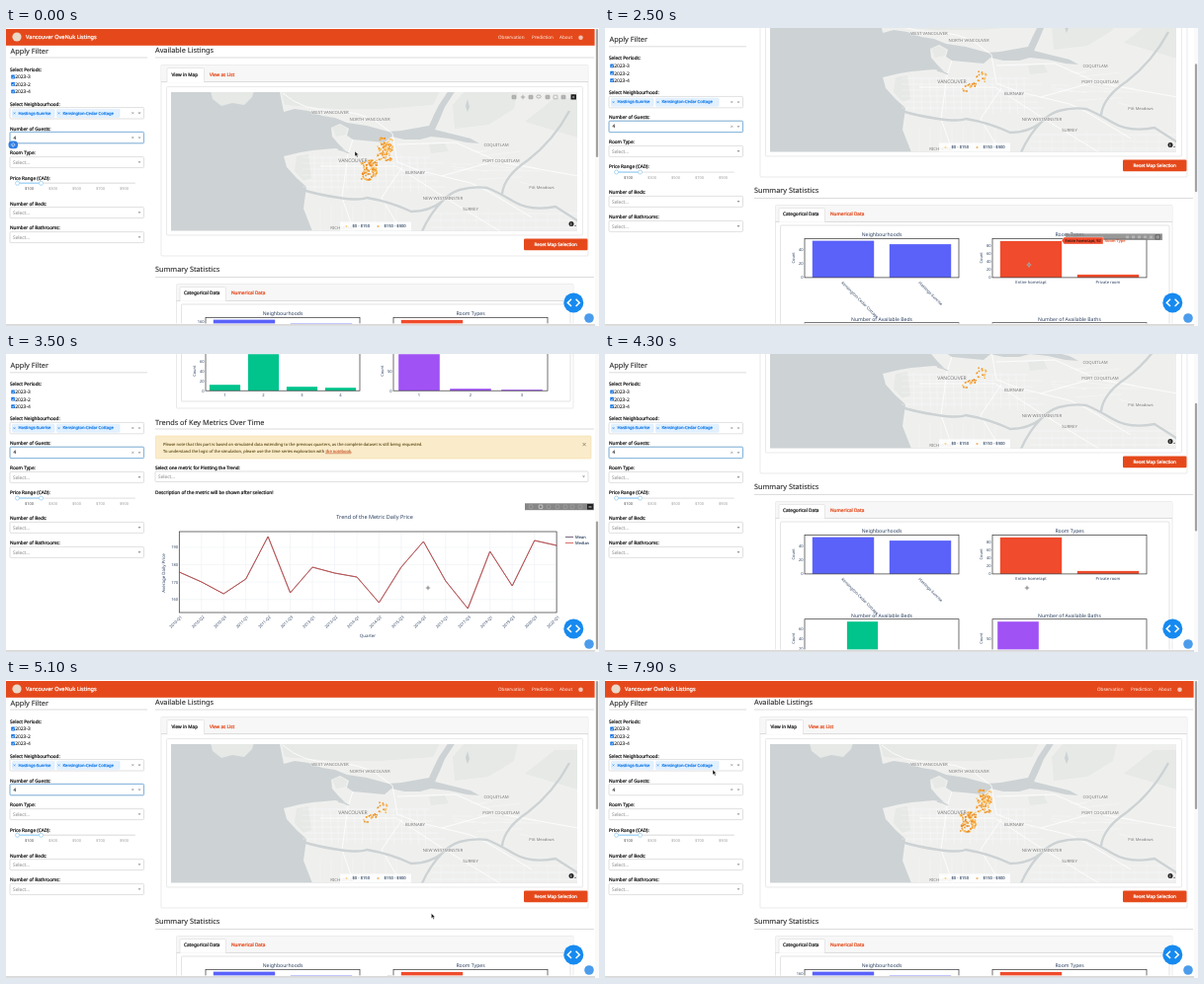
An HTML page for the animation above (8 s loop, 600 px wide and 302 px high).

```html
<!DOCTYPE html>
<html lang="en">
<head>
<meta charset="utf-8">
<title>Listings dashboard</title>
<style>
html, body { margin: 0; width: 100%; height: 100%; overflow: hidden; background: #fff; }
svg { display: block; width: 600px; height: 302px; }
text { font-family: "Noto Sans", "Open Sans", sans-serif; text-rendering: geometricPrecision; white-space: pre; }
.medium { stroke-width: .24px; }
</style>
</head>
<body>
<svg id="stage" viewBox="0 0 600 302" xmlns="http://www.w3.org/2000/svg"></svg>
<script>
const ORANGE = '#e5491b', INK = '#222', PLOT = '#2a3f5f', LINE = '#dcdcdc';
const LOOP = 8000, STEP = 100, MAX_SCROLL = 381;

// Markup helpers; text is placed by the middle of its capitals.
const text = (x, y, s, size = 4.7, fill = INK, attrs = `stroke="${fill}" stroke-width=".08"`) =>
  `<text x="${x}" y="${y + size * .35}" font-size="${size}" fill="${fill}" ${attrs}>${s}</text>`;
const medium = (x, y, s, size = 4.7, fill = INK, anchor = 'start') =>
  text(x, y, s, size, fill, `class="medium" stroke="${fill}" text-anchor="${anchor}"`);
const mid = (x, y, s, size, fill, attrs = '') => text(x, y, s, size, fill, 'text-anchor="middle" ' + attrs);
const end = (x, y, s, size, fill) => text(x, y, s, size, fill, 'text-anchor="end"');
const turned = (x, y, deg, s, size, anchor = 'start') =>
  `<g transform="translate(${x} ${y}) rotate(${deg})">${text(0, 0, s, size, PLOT, `text-anchor="${anchor}"`)}</g>`;
const rect = (x, y, x2, y2, fill, stroke = 'none', r = 0, w = .6) =>
  `<rect x="${x}" y="${y}" width="${x2 - x}" height="${y2 - y}" fill="${fill}" stroke="${stroke}" rx="${r}" stroke-width="${w}"/>`;
const path = (d, fill, stroke = 'none', w = .6) =>
  `<path d="${d}" fill="${fill}" stroke="${stroke}" stroke-width="${w}"/>`;
const dot = (x, y, r, fill, stroke = 'none') =>
  `<circle cx="${x}" cy="${y}" r="${r}" fill="${fill}" stroke="${stroke}" stroke-width=".7"/>`;
const rule = (x, x2, y) => path(`M${x} ${y}H${x2}`, 'none', '#c4c4c4', .6);
const group = (id, body) => `<g id="${id}">${body}</g>`;
const cross = (x, y, c) => path(`M${x - 1} ${y - 1}l2 2m0-2l-2 2`, 'none', c, .6);
const caret = (x, y) => path(`M${x - 1.5} ${y - .8}h3l-1.5 1.8z`, '#999');

function random(seed) {
  return () => (seed = (seed * 16807) % 2147483647) / 2147483647;
}

function select(x, y, x2, y2) {
  return rect(x, y, x2, y2, '#fff', '#ccc', 1) + text(x + 3, (y + y2) / 2, 'Select...', 4.8, '#999')
    + caret(x2 - 4.5, (y + y2) / 2);
}

function header() {
  return rect(0, 1, 595.6, 17.8, ORANGE) + dot(11, 9, 4.6, '#ead9c8')
    + medium(20, 9, 'Vancouver OveNuk Listings', 5.6, '#fff')
    + text(498, 9.8, 'Observation', 4.6, '#fbd5c8') + text(532, 9.8, 'Prediction', 4.6, '#fbd5c8')
    + text(560, 9.8, 'About', 4.6, '#fbd5c8') + dot(581.5, 9.8, 2.3, '#f6c3b2');
}

function sidebar() {
  const label = (y, s) => medium(4, y, s);
  const periods = ['2023-3', '2023-2', '2023-4'].map((s, i) => {
    const y = 49.6 + i * 7.4;
    return rect(5.2, y - 2, 9, y + 1.8, '#1976e0', 'none', .6)
      + path(`M6 ${y}l1 1l1.4-2`, 'none', '#fff', .6) + text(9.2, y, s, 4.9);
  }).join('');
  const chip = (x, x2, s) => rect(x, 82.4, x2, 90.4, '#e3f1ff', '#cfe6ff', .8, .5)
    + cross(x + 2, 86.4, '#2c8cf0') + medium(x + 6, 86.2, s, 4.15, '#1b7fe8');
  const prices = [100, 300, 500, 700, 900]
    .map((p, i) => mid(23.5 + i * 24, 163, '$' + p, 3.9, i ? '#999' : '#444')).join('');
  return rect(0, 18.2, 148, 302, '#fff') + text(4.5, 23, 'Apply Filter', 7.3) + rule(4, 143, 30)
    + label(42, 'Select Periods:') + periods
    + label(77, 'Select Neighbourhood:') + rect(4, 80.6, 139.5, 92, '#fff', '#ccc', 1)
    + chip(6.5, 49, 'Hastings-Sunrise') + chip(51.5, 115, 'Kensington-Cedar Cottage')
    + cross(128.3, 86.2, '#888') + caret(135, 86.4)
    + label(102, 'Number of Guests:') + rect(4, 105.4, 139.5, 116.8, '#fff', '#ccc', 1)
    + group('focus', rect(4, 105.4, 139.5, 116.8, 'none', '#6aa9dc', 1, .8))
    + text(7.5, 111, '4', 4.8) + cross(128.3, 111, '#888') + caret(135, 111.2)
    + group('badge', rect(2.5, 114.5, 12, 122.2, '#2f7fe6', 'none', 3.5)
      + path('M7.2 116.4l-2 2h1.2v1.7h1.6v-1.7h1.2z', 'none', '#fff', .5))
    + label(126.8, 'Room Type:') + select(4, 130.6, 139.5, 141.6)
    + label(152, 'Price Range (CAD):')
    + rect(11, 156.6, 131, 158, '#e6e6e6', 'none', .7) + rect(11, 156.6, 35.5, 158, '#a9d8f8')
    + dot(11.5, 157.3, 2, '#fff', '#8fcaf3') + dot(35.5, 157.3, 2, '#fff', '#8fcaf3') + prices
    + label(178, 'Number of Beds:') + select(4, 181.6, 139.5, 192.6)
    + label(202.8, 'Number of Bathrooms:') + select(4, 206.6, 139.5, 217.6);
}

// Listing dots fill two neighbouring districts; the lasso keeps a diagonal band.
function listings() {
  const rnd = random(77), hues = ['#fbb54a', '#f39a2e', '#fcc56b', '#e98a1f'];
  let all = '', kept = '';
  for (let i = 0; i < 210; i++) {
    const upper = i % 2;
    const x = upper ? 375.5 + rnd() * 15.5 : 359.5 + rnd() * 16;
    const y = upper ? 111 + rnd() * 24 : 134 + rnd() * 20;
    const hue = hues[Math.floor(rnd() * 4)];
    if (upper && x < 378 && y < 119) continue;
    if (!upper && x > 372 && y > 150) continue;
    const mark = dot(x.toFixed(1), y.toFixed(1), .9, hue);
    all += mark;
    const inside = upper ? y > 124 && x < 387.5 : Math.abs(y - 145 + (x - 359) * .55) < 3;
    if (inside && i % 5 < 3) kept += mark;
  }
  return group('all', all) + group('kept', kept);
}

function streets() {
  const rnd = random(9);
  let d = '';
  for (let x = 312; x < 430; x += 8) d += `M${x} ${128 + rnd() * 4}l${rnd() * 2} 36`;
  for (let y = 131; y < 164; y += 6) d += `M300 ${y}H${425 + rnd() * 20}`;
  for (let x = 440; x < 576; x += 12) d += `M${x} ${182 + rnd() * 9}V205`;
  for (let y = 188; y < 205; y += 7) d += `M430 ${y}H578`;
  for (let x = 318; x < 400; x += 11) d += `M${x} 180V205`;
  for (let i = 0; i < 12; i++) d += `M${440 + rnd() * 80} ${122 + rnd() * 34}l${10 + rnd() * 40} ${rnd() * 14 - 7}`;
  return path(d, 'none', '#fafaf9', .4);
}

function map() {
  const WATER = '#cdd2d4', LAND = '#eff0ee', HILL = '#e6e9e6';
  const place = (x, y, s, size = 4.3) =>
    mid(x, y, s, size, '#777', 'stroke="#f3f3f2" stroke-width=".8" paint-order="stroke"');
  const tools = [514, 523, 531, 539, 548, 556, 564].map((x, i) =>
    i == 3 ? `<ellipse cx="${x}" cy="69.5" rx="2.2" ry="1.6" fill="none" stroke="#999" stroke-width=".7"/>`
      : i == 1 ? path(`M${x - 2.2} 70h4.4m-2.2-2.2v4.4`, 'none', '#999', .8)
        : rect(x - 2, 68.2, x + 2, 71.8, i % 2 ? 'none' : '#b5b5b5', '#999', .5)).join('');
  const northShore = 'M276 60L281 85L292 82L306 84L320 89L333 91L345 96L365 99L387 105L400 104L428 99L433 88L438 78L450 60Z';
  const southShore = 'M457 60L444 80L439 92L434 103L450 107L470 112L479 117L466 116L448 112L430 110L419 113L403 113L390 110L383 116L351 113L345 109L347 102L338 97L329 101L330 110L336 117L343 124L333 122L310 124L298 126L281 130L284 141L294 152L304 161L301 183L310 206H579V60Z';
  const parks = 'M294 130l12-2l3 24l-8 3l-9-10zM330 101l8-3l7 4l-1 6l-10 2zM428 118l16-1l4 8l-18 2zM452 78l12-14h54l-4 18l-26 16l-34 4zM278 62h162l-8 16l-54 4l-44 0l-52-4zM525 95l30-24h24v40z';
  const rivers = 'M300 164q16 5 37 8t28 0q24 4 45 14q18 0 31-10q8-9 18-12q14-4 28-2q10 4 27 14t42 5l28 18M441 176q-12 12-20 30M502 168q2-18 26-34q26-20 42-50';
  const highways = 'M280 66Q300 84 333 84Q358 85 375 95L391 107L396 136Q418 146 441 150L470 157L487 165L532 192M351 113L346 128L340 172L352 206M318 140H395L441 170L500 206M396 118L455 116L500 136L579 150M441 150L505 132M401 141L380 172L400 206';
  return `<clipPath id="mapClip"><rect x="167" y="65" width="411" height="140.5"/></clipPath><g clip-path="url(#mapClip)">`
    + rect(167, 65, 578, 206, WATER)
    + path('M206 60l3 12l9 7l11-3l12 2l8-8l3-10z', HILL)
    + path(northShore, LAND) + path(southShore, LAND) + path(parks, HILL)
    + streets() + path(highways, 'none', '#fff', .8)
    + path(rivers, 'none', WATER, 2.4)
    + path('M336 123q6 1 11 4', 'none', WATER, 1.4) + path('M467 72l2 8l-2 5l-2-6z', WATER)
    + place(328, 85, 'WEST VANCOUVER') + place(368, 92, 'NORTH VANCOUVER') + place(351, 134, 'VANCOUVER', 5)
    + place(414, 146, 'BURNABY') + place(496, 118, 'COQUITLAM') + place(501, 134, 'PORT COQUITLAM')
    + place(442, 172, 'NEW WESTMINSTER') + place(470, 183, 'SURREY') + place(542, 162, 'Pitt Meadows', 4)
    + place(340, 202.5, 'RICHMOND')
    + listings() + `<path id="lasso" fill="rgba(80,80,80,.08)" stroke="#555" stroke-width=".6" stroke-dasharray="1.5 1"/>`
    + rect(338, 196.5, 410, 206, 'rgba(255,255,255,.85)') + dot(344.5, 201, 1.1, '#fbd38f') + text(350.5, 201, '$0 - $150', 4.1, PLOT)
    + dot(376.5, 201, 1.1, '#f5b066') + text(382.5, 201, '$150 - $300', 4.1, PLOT)
    + dot(572, 198.5, 2.5, '#222') + mid(571.9, 198.5, 'i', 4, '#fff', 'font-weight="700"')
    + path('M575 201l1.5-1.5v1.5z', '#333')
    + group('mapTools', tools + rect(571.5, 67.3, 577, 72.5, '#222', 'none', .5) + path('M573 70h2.2', 'none', '#fff', .8)) + '</g>';
}

function available() {
  return text(151, 22.8, 'Available Listings', 7.3) + rule(151, 595, 30)
    + rect(157, 37.5, 589, 231, '#fff', LINE, 1) + rect(157.3, 37.8, 588.7, 54.6, '#f7f7f7') + rule(157, 589, 54.6)
    + path('M163 55V41.5q0-1 1-1H199.5q1 0 1 1V55', '#fff', LINE) + medium(167.5, 47.4, 'View in Map')
    + medium(206, 47.4, 'View as List', 4.7, ORANGE) + rect(162.5, 59.5, 583.5, 210, '#fff', LINE, 1)
    + map() + rect(524, 213.6, 588.5, 225.2, ORANGE, 'none', 1.2)
    + medium(556.2, 219.3, 'Reset Map Selection', 4.6, '#fff', 'middle');
}

// One small bar chart: heights in pixels, ticks as [label, distance above the axis].
function bars(x, top, title, fill, heights, ticks, names) {
  const w = 156, slot = w / heights.length, gap = slot * .1, base = top + 39.5;
  return mid(x + w / 2, top - 3.8, title, 5.1, PLOT)
    + heights.map((h, i) => rect(x + i * slot + gap, base - h, x + (i + 1) * slot - gap, base, fill)).join('')
    + rect(x, top, x + w, base, 'none', '#333', 0, .7)
    + ticks.map(([s, up]) => end(x - 1.5, base - up, s, 4, PLOT)).join('')
    + turned(x - 11, top + 19.5, -90, 'Count', 4, 'middle')
    + names.map((s, i) => mid(x + (i + .5) * slot, base + 4.2, s, 4.1, PLOT)).join('');
}

function summary() {
  return text(151, 244.6, 'Summary Statistics', 7.3) + rule(151, 595, 252.5)
    + rect(172.5, 259.5, 574, 436, '#fff', LINE, 1) + rect(172.8, 259.8, 573.7, 276.4, '#f7f7f7') + rule(172.5, 574, 276.4)
    + path('M176 276.8V263.5q0-1 1-1H221.5q1 0 1 1V276.8', '#fff', LINE)
    + medium(180, 268.8, 'Categorical Data') + medium(228, 268.8, 'Numerical Data', 4.7, ORANGE)
    + rect(177.5, 280, 571, 429, '#fff', '#d2d2d2', 1)
    + bars(202, 293.4, 'Neighbourhoods', '#5a62fa', [37.3, 33.8], [], [])
    + turned(240, 337.5, 45, 'Kensington-Cedar Cottage', 4.1) + turned(318, 337.5, 45, 'Hastings-Sunrise', 4.1)
    + group('countsAll', end(200.5, 298, '160', 4, PLOT))
    + group('countsKept', [40, 20, 0].map(v => end(200.5, 333 - v * .72, v, 4, PLOT)).join('')
      + [80, 60, 40, 20, 0].map(v => end(390.5, 333 - v * .4, v, 4, PLOT)).join(''))
    + bars(392, 293.4, 'Room Types', '#ef4b2c', [37, 3], [], ['Entire home/apt', 'Private room'])
    + bars(202, 378.7, 'Number of Available Beds', '#00c48c', [6, 37, 4, 3], [['0', 0], ['20', 10], ['40', 20], ['60', 30]], [1, 2, 3, 4])
    + bars(392, 378.7, 'Number of Available Baths', '#a052f5', [37, 2, 1], [['0', 0], ['50', 20]], [1, 2, 3])
    + group('hover', rect(466, 288.4, 564, 295, 'rgba(135,135,135,.85)')
      + [527, 533, 539, 545, 551].map(x => rect(x, 290.5, x + 3, 293.2, '#b5b5b5')).join('') + rect(557, 289.8, 561.5, 294, 'none', '#444')
      + path('M462 295.5l2.500-3.500H504v7H464.500z', '#ef4b2c', '#fff', .4) + text(465.5, 295.5, 'Entire home/apt, 92', 3.9, '#2b1510')
      + text(505.5, 295.5, 'Room Type', 4, ORANGE));
}

function trend() {
  const ys = [221, 231, 243, 228, 185, 242, 216, 222, 226, 252, 216, 190, 230, 258, 200, 235, 189, 194];
  const quarters = '10-Q1 10-Q2 10-Q3 11-Q1 11-Q2 11-Q3 13-Q1 13-Q2 14-Q1 14-Q2 15-Q3 16-Q2 17-Q1 17-Q3 19-Q1 19-Q3 20-Q3 22-Q1'.split(' ');
  const px = i => 175.3 + i * 22.46;
  const line = 'M' + ys.map((y, i) => px(i).toFixed(1) + ' ' + y).join('L');
  const gridX = ys.map((_, i) => `M${px(i).toFixed(1)} 180V262`).join('');
  return `<g transform="translate(0 ${MAX_SCROLL})">`
    + text(151, 69, 'Trends of Key Metrics Over Time', 7.3) + rule(151, 595, 76)
    + rect(151.5, 83, 592, 106, '#faecca', '#f3dca5', 1)
    + text(159, 91.5, 'Please note that this part is based on simulated data extending to the previous quarters, as the complete dataset is still being requested.', 4.1, '#5f4a17')
    + text(159, 98.2, `To understand the logic of the simulation, please use the time series exploration with <tspan fill="${ORANGE}" text-decoration="underline">the notebook</tspan>.`, 4.1, '#5f4a17')
    + path('M583.5 90l3.2 3.2m0-3.2l-3.2 3.2', 'none', '#8b7f62', .8)
    + medium(151, 115, 'Select one metric for Plotting the Trend:', 4.6) + select(151, 119, 589, 129.5)
    + medium(151, 140, 'Description of the metric will be shown after selection!', 4.7)
    + group('trendTools', rect(525, 151.3, 595, 158.2, '#868686')
      + [531, 541, 549, 558, 566, 573, 581].map((x, i) => rect(x - 1.8, 153, x + 1.8, 156.6, 'none', i == 1 ? '#eee' : '#a9a9a9', .5)).join('')
      + rect(588, 152, 594, 157.6, '#222') + path('M589.5 155h3', 'none', '#fff', .8))
    + mid(373, 165, 'Trend of the Metric Daily Price', 5.5, PLOT)
    + path(gridX + 'M175.3 196H557M175.3 213.5H557M175.3 231H557M175.3 248.7H557', 'none', '#e9edf3', .5)
    + rect(175.3, 180, 557.1, 262, 'none', '#333', 0, .7)
    + [190, 180, 170, 160].map((v, i) => end(174, 196 + i * 17.6, v, 4, PLOT)).join('')
    + path(line, 'none', '#55405f', .7) + path(line, 'none', '#cf4a41', .8)
    + quarters.map((q, i) => turned(px(i) + 2, 265.8, -45, '20' + q, 4, 'end')).join('')
    + mid(366, 285.3, 'Quarter', 4.4, PLOT) + turned(159, 222, -90, 'Average Daily Price', 4.4, 'middle')
    + path('M566 185.5h8', 'none', '#55405f', .8) + text(576, 185.5, 'Mean', 4, PLOT)
    + path('M566 191.5h8', 'none', '#cf4a41', .8) + text(576, 191.5, 'Median', 4, PLOT) + '</g>';
}

function overlay() {
  return rect(0, 299.4, 600, 302, '#fff') + rect(0, 300.3, 596, 301.6, '#c9c9c9')
    + rect(596, 0, 600, 302, '#fafafa') + `<rect id="thumb" x="596.9" width="2.2" height="130" rx="1.1" fill="#a2a2a2"/>`
    + dot(574.3, 278.4, 10, '#168af0') + path('M572 274.8l-3.7 3.6l3.7 3.6M576.6 274.8l3.7 3.6l-3.7 3.6', 'none', '#fff', 1.5)
    + dot(590, 294, 4.8, '#4b9cec')
    + group('arrow', path('M0 0v5l1.2-1.1l.9 2l.9-.4l-.9-1.9h1.6z', '#111', '#fff', .35))
    + group('plus', path('M-2.2 0h4.4M0-2.2v4.4', 'none', '#fff', 1.2) + path('M-2.2 0h4.4M0-2.2v4.4', 'none', '#444', .6))
    + group('hand', path('M-.6-2.5h1.1v2.3l2 .5v1.7l-.8 1.6h-2.4l-1.7-2.2l.6-.5l1.2.7z', '#fff', '#111', .6));
}

const stage = document.getElementById('stage');
stage.innerHTML = rect(0, 0, 600, 302, '#fff')
  + group('page', header() + available() + summary() + trend())
  + group('side', sidebar()) + group('top', overlay());
const el = id => document.getElementById(id);
const show = (id, on) => el(id).style.display = on ? '' : 'none';
const move = (id, x, y) => el(id).setAttribute('transform', `translate(${x} ${y})`);

// Motion tables: [time, values...]
const scrollKeys = [[0, 0], [2050, 0], [2400, 80], [2650, 80], [3300, MAX_SCROLL], [3700, MAX_SCROLL], [4300, 110], [4600, 64], [4900, 0]];
const lassoFrom = 300, lassoTo = 1000;
const lassoPts = [[357, 142], [366, 133], [374, 127], [382, 122], [389, 126], [388, 136], [376, 141], [366, 148], [358, 148]];
const pointerKeys = [[0, 353, 125],
  ...lassoPts.map((p, i) => [lassoFrom + (lassoTo - lassoFrom) * i / (lassoPts.length - 1), ...p]),
  [1300, 362, 150], [1800, 434, 240], [2200, 434, 240], [2500, 429, 240], [3300, 427, 237], [5000, 427, 237],
  [6000, 548, 221], [7200, 548, 221], [7800, 109, 91]];
const RESET = 6500;

function sample(keys, t) {
  const i = keys.findIndex(k => k[0] > t);
  if (i < 0) return keys[keys.length - 1].slice(1);
  const a = keys[i - 1], b = keys[i], p = (t - a[0]) / (b[0] - a[0]), e = p * p * (3 - 2 * p);
  return a.slice(1).map((v, n) => v + (b[n + 1] - v) * e);
}

function draw(t) {
  const [scroll] = sample(scrollKeys, t), [x, y] = sample(pointerKeys, t);
  const kept = t >= 1200 && t < RESET;
  const overMap = scroll < 1 && x > 167 && x < 578 && y > 65 && y < 206;
  const drawing = t >= lassoFrom && t < 1200;
  const shape = t >= 2300 && t < 5100 ? 'plus' : t >= 5900 && t < 7300 ? 'hand' : 'arrow';

  move('page', 0, -scroll);
  move('side', 0, -Math.min(scroll, 11.2));
  el('thumb').setAttribute('y', 1 + scroll * 302 / (302 + MAX_SCROLL));
  show('all', !kept); show('kept', kept);
  show('countsAll', !kept); show('countsKept', kept);
  show('focus', t < RESET); show('badge', t < 2100);
  show('mapTools', overMap);
  show('hover', t >= 2400 && t < 2700);
  show('trendTools', t >= 3300 && t < 3800);
  show('lasso', drawing);
  if (drawing) {
    const n = Math.floor((t - lassoFrom) / (lassoTo - lassoFrom) * (lassoPts.length - 1)) + 1;
    el('lasso').setAttribute('d', 'M' + [...lassoPts.slice(0, n), [x, y]].map(p => p.join(' ')).join('L') + 'Z');
  }
  for (const id of ['arrow', 'plus', 'hand']) show(id, id === shape);
  move(shape, x, y);
}

const start = performance.now();
function tick() {
  const t = (performance.now() - start) % LOOP;
  draw(Math.floor(t / STEP) * STEP);
  requestAnimationFrame(tick);
}
tick();
</script>
</body>
</html>
```
